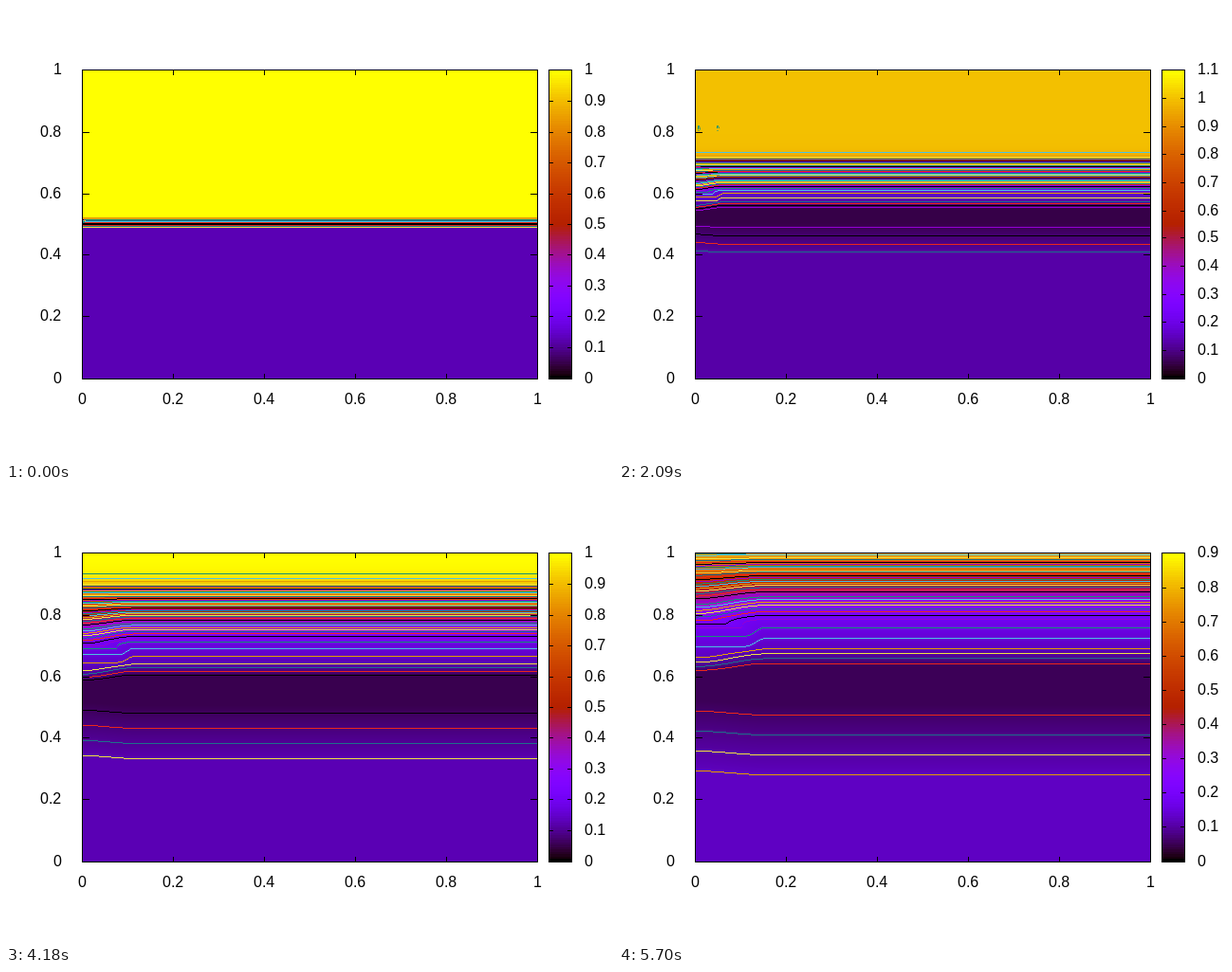
An HTML page with a canvas for the animation above (5.89 s loop, 640x480 px).

```html
<!DOCTYPE html>
<html lang="en">
<head>
<meta charset="utf-8">
<title>Expanding wave</title>
<style>
  html, body { margin: 0; width: 100%; height: 100%; overflow: hidden; background: #fff; }
  canvas, svg { position: absolute; left: 0; top: 0; width: 640px; height: 480px; }
  text { font: 16px "Liberation Sans", Arial, sans-serif; fill: #000; }
  path { stroke: #000; fill: none; shape-rendering: crispEdges; }
</style>
</head>
<body>
<canvas id="stage" width="640" height="480"></canvas>
<svg viewBox="0 0 640 480"><g id="frame"></g><g id="scale"></g></svg>
<script>
const STEP = 190, STEPS = 31;
const LEFT = 80, TOP = 67, WIDTH = 480, HEIGHT = 326, BOTTOM = TOP + HEIGHT;
const COLS = WIDTH - 1, ROWS = HEIGHT - 1;
const LEVEL = 0.02;
const GREEN = [20, 145, 120];
const LINES = [
  [148, 0, 211], GREEN, [75, 195, 228], [230, 159, 0],
  [240, 228, 66], [30, 112, 140], [235, 40, 25], [0, 0, 0]
];

const ctx = document.getElementById("stage").getContext("2d");
const image = ctx.createImageData(COLS, ROWS);
const frame = document.getElementById("frame");
const scale = document.getElementById("scale");

const clamp = v => Math.max(0, Math.min(1, v));
const smooth = (a, b, x) => { const t = clamp((x - a) / (b - a)); return t * t * (3 - 2 * t); };
const random = i => { const s = Math.sin(i * 12.9898 + 4) * 43758.5453; return s - Math.floor(s); };

function palette(v) {
  const t = clamp(v);
  return [Math.sqrt(t), t ** 3, Math.max(0, Math.sin(2 * Math.PI * t))].map(c => Math.round(c * 255));
}

// Shock-tube density at speed s after n steps: shock, near vacuum, contact, rarefaction fan.
function density(s, n) {
  const age = n / STEPS;
  const shock = Math.min(.125, .0525 - 9.6 * s * age ** .07);
  const contact = Math.min(.06 + 40 * (s - .0046), .12 + 18 * (s - .0061));
  const soft = .03 * age ** -.25;
  const drop = soft * Math.log1p(Math.exp(37 * (.01705 - s) / soft));
  const fan = Math.max(0, 1 - drop) ** 5;
  return Math.max(.05, shock, Math.min(1, Math.max(contact > .12 ? Math.min(contact, .2) : contact, fan)));
}

// The wall at x = 0 drags the flow within a region that grows with n.
function valueAt(x, y, n) {
  const s = (y - .5) / n;
  const start = .0034 * smooth(.0055, .0065, s) * (1 - smooth(.008, .0095, s));
  const wall = 1 - smooth(start, .0049, x / n);
  const drag = .0004 - .0013 * smooth(0, .005, s) + .0009 * smooth(.009, .017, s);
  return density(s - drag * wall, n);
}

function drawColumn(col, n, max, top) {
  const at = edge => valueAt(col / WIDTH, (ROWS + .5 - edge) / HEIGHT, n);
  let above = at(0);
  for (let row = 0; row < ROWS; row++) {
    const below = at(row + 1);
    const level = Math.ceil(Math.min(above, below) / LEVEL - 1e-9);
    const crossed = level <= top && level * LEVEL < Math.max(above, below);
    const rgb = crossed ? LINES[(1 + top - level) % 8] : palette((above + below) / 2 / max);
    image.data.set([...rgb, 255], 4 * (row * COLS + col));
    above = below;
  }
}

// Small overshoot outlines that surface ahead of the wave and drift upwards.
function drawRipples(k) {
  const base = 107.5 - 6 * (k - 15);
  const sink = Math.max(0, 5.5 * (15 - k));
  const count = Math.max(17, 4 * (k - 11));
  ctx.save();
  ctx.beginPath();
  ctx.rect(LEFT + 1, TOP + 1, COLS, ROWS);
  ctx.clip();
  ctx.strokeStyle = `rgb(${GREEN})`;
  ctx.beginPath();
  for (let i = 0; i < count; i++) {
    const crest = Math.cos(i * Math.PI / 10) ** 8;
    const height = 3 + 24 * crest + 10 * random(i) * (1 - crest) - sink;
    if (height <= 0) continue;
    const x = 83.5 + 2 * i, foot = base - Math.min(height, 4 * random(i + 50));
    ctx.moveTo(x, foot);
    ctx.lineTo(x, base - height);
    ctx.lineTo(x + 1, base - height);
    ctx.lineTo(x + 2, foot);
    ctx.moveTo(x, base);
    ctx.lineTo(x + 1, base);
  }
  ctx.stroke();
  ctx.restore();
}

const label = (x, y, text) => `<text x="${x}" y="${y}">${text}</text>`;
const labelWidth = text => text.length > 1 ? 23 : 9;
const box = (x, y, w, h) => `M${x + .5} ${y + .5}h${w}v${h}h${-w}z`;
const tickPair = (x, y, w, len) => `M${x} ${y + .5}h${len}M${x + w + 1} ${y + .5}h${-len}`;
const tickY = f => TOP + HEIGHT / 2 + Math.trunc((.5 - f) * HEIGHT);

function drawAxes() {
  let lines = box(LEFT, TOP, WIDTH, HEIGHT), texts = "";
  for (let i = 0; i <= 5; i++) {
    const x = LEFT + i * WIDTH / 5, y = tickY(i / 5);
    const name = String(i / 5), w = labelWidth(name);
    lines += tickPair(LEFT, y, WIDTH, 8);
    lines += `M${x + .5} ${BOTTOM + 1}v-6M${x + .5} ${TOP}v6`;
    texts += label(59 - w, y + 5, name) + label(x + .5 - w / 2, 420, name);
  }
  frame.innerHTML = `<path d="${lines}"/>` + texts;
}

function drawScale(max) {
  for (let row = 0; row < ROWS; row++) {
    const t = Math.floor((1 - (row + .5) / ROWS) * 128) / 127;
    ctx.fillStyle = `rgb(${palette(t)})`;
    ctx.fillRect(573, TOP + 1 + row, 23, 1);
  }
  let lines = box(572, TOP, 24, HEIGHT), texts = "";
  const count = Math.round(max * 10);
  for (let i = 0; i <= count; i++) {
    const y = tickY(i / count);
    lines += tickPair(572, y, 24, 5);
    texts += label(610, y + 5, String(i / 10));
  }
  scale.innerHTML = `<path d="${lines}"/>` + texts;
}

function drawStep(k) {
  const n = k + 1;
  const overshoot = k >= 9 && k <= 20;
  const peak = valueAt(0, 1, n);
  const max = overshoot ? 1.1 : peak > .9 ? 1 : .9;
  const top = overshoot ? 50 : Math.floor((peak - 1e-6) / LEVEL);

  const bend = Math.ceil(.005 * n * WIDTH) + 1;
  for (let col = 0; col <= bend; col++) drawColumn(col, n, max, top);
  for (let row = 0; row < ROWS; row++) {
    const start = 4 * (row * COLS + bend);
    const rgba = image.data.slice(start, start + 4);
    for (let col = bend + 1; col < COLS; col++) image.data.set(rgba, 4 * (row * COLS + col));
  }

  ctx.fillStyle = "#fff";
  ctx.fillRect(0, 0, 640, 480);
  ctx.putImageData(image, LEFT + 1, TOP + 1);
  if (overshoot) drawRipples(k);
  drawScale(max);
}

let shown = -1;
const begin = performance.now();
function tick() {
  const k = Math.floor((performance.now() - begin) / STEP) % STEPS;
  if (k !== shown) drawStep(shown = k);
  requestAnimationFrame(tick);
}
drawAxes();
tick();
</script>
</body>
</html>
```
